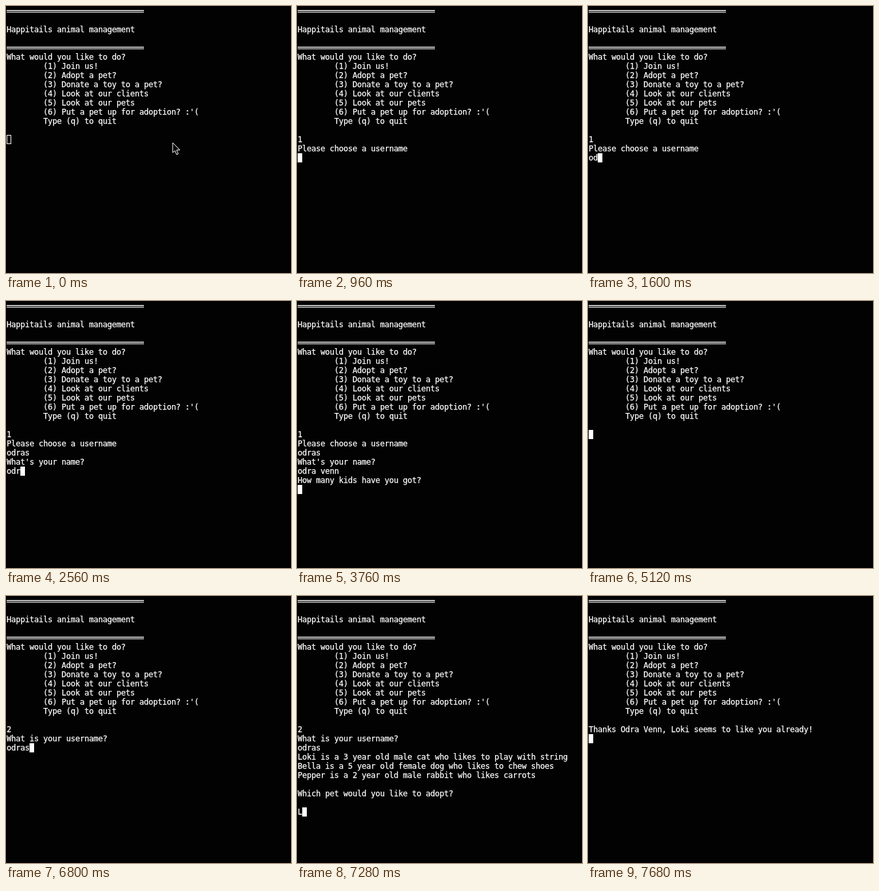
An HTML page that plays this animation: 436x408 px, repeating every 8000 ms.

```html
<!DOCTYPE html>
<html lang="en">
<head>
<meta charset="utf-8">
<title>Terminal session</title>
<style>
  html, body { margin: 0; width: 100%; height: 100%; overflow: hidden; background: #020202; }
  #stage { position: relative; width: 436px; height: 408px; overflow: hidden; background: #020202; }
  #stage > * { position: absolute; box-sizing: border-box; }
  pre {
    left: 1px; top: 1px; margin: 0; color: #fff;
    font: 12px/14px "DejaVu Sans Mono", monospace;
    letter-spacing: calc(7px - 1ch);
    -webkit-text-stroke: .25px #fff;
  }
  .rule { left: 1px; width: 210px; height: 4px; border: solid #bbb; border-width: 2px 0 1px; border-bottom-color: #fff; }
  #caret { width: 7px; height: 14px; border: 1px solid #fff; }
  #caret.on { background: #fff; }
</style>
</head>
<body>
<div id="stage">
  <pre id="screen"></pre>
  <div class="rule" style="top:6px"></div>
  <div class="rule" style="top:62px"></div>
  <div id="caret"></div>
  <svg id="mouse" width="14" height="21" viewBox="-1 -1 14 21">
    <path d="M0 0V15L3.5 12L6 18L8.5 17L6 11H11Z" fill="#000" stroke="#fff"/>
  </svg>
</div>
<script>
const $ = id => document.getElementById(id);
const screen = $('screen'), caret = $('caret'), mouse = $('mouse');
const LOOP = 8000, COL = 7, ROW = 14;

const menu = `

Happitails animal management


What would you like to do?
        (1) Join us!
        (2) Adopt a pet?
        (3) Donate a toy to a pet?
        (4) Look at our clients
        (5) Look at our pets
        (6) Put a pet up for adoption? :'(
        Type (q) to quit

`;

const pets = `
Loki is a 3 year old male cat who likes to play with string
Bella is a 5 year old female dog who likes to chew shoes
Pepper is a 2 year old male rabbit who likes carrots

Which pet would you like to adopt?

`;

// One key per 80 ms step
const type = (start, keys) => [...keys].map((k, i) => [start + i * 80, k]);

// [time, output]; a form feed clears back to the menu
const events = [
  [640, '1'],
  [880, '\nPlease choose a username\n'],
  [1280, 'o'], [1440, 'd'],
  ...type(1760, 'ras'),
  [2000, "\nWhat's your name?\n"],
  ...type(2400, 'odr'), [2720, 'a'],
  [3120, ' v'], ...type(3200, 'enn'),
  [3440, '\nHow many kids have you got?\n'],
  [3920, '0\nHow old are you?\n'],
  ...type(4480, '25'),
  [4640, '\f'],
  [4720, 'Thanks Odra Venn, you are now registered with Happitails!\n'],
  [5120, '\f'],
  [5680, '2'],
  [5760, '\nWhat is your username?\n'],
  [6400, 'o'], ...type(6560, 'dras'),
  [6960, pets],
  ...type(7280, 'Loki'),
  [7600, '\f'],
  [7680, '\fThanks Odra Venn, Loki seems to like you already!\n'],
];

// [time, x, y] of the pointer tip
const moves = [[0, 254, 208], [80, 264, 222], [160, 272, 236], [240, 265, 234], [400, 263, 232]];

function draw(t) {
  const output = events.filter(e => e[0] <= t).map(e => e[1]).join('').split('\f').pop();
  const text = menu + output;
  screen.textContent = text;

  const lines = text.split('\n');
  caret.style.left = 1 + lines.at(-1).length * COL + 'px';
  caret.style.top = 1 + (lines.length - 1) * ROW + 'px';
  caret.className = t >= 240 ? 'on' : '';

  const [, x, y] = moves.findLast(m => m[0] <= t);
  mouse.style.left = x - 0.5 + 'px';
  mouse.style.top = y - 0.5 + 'px';
  mouse.style.display = t < 480 ? 'block' : 'none';
}

let start;
function tick(now) {
  start ??= now;
  draw(Math.max(0, now - start) % LOOP);
  requestAnimationFrame(tick);
}
draw(0);
requestAnimationFrame(tick);
</script>
</body>
</html>
```
